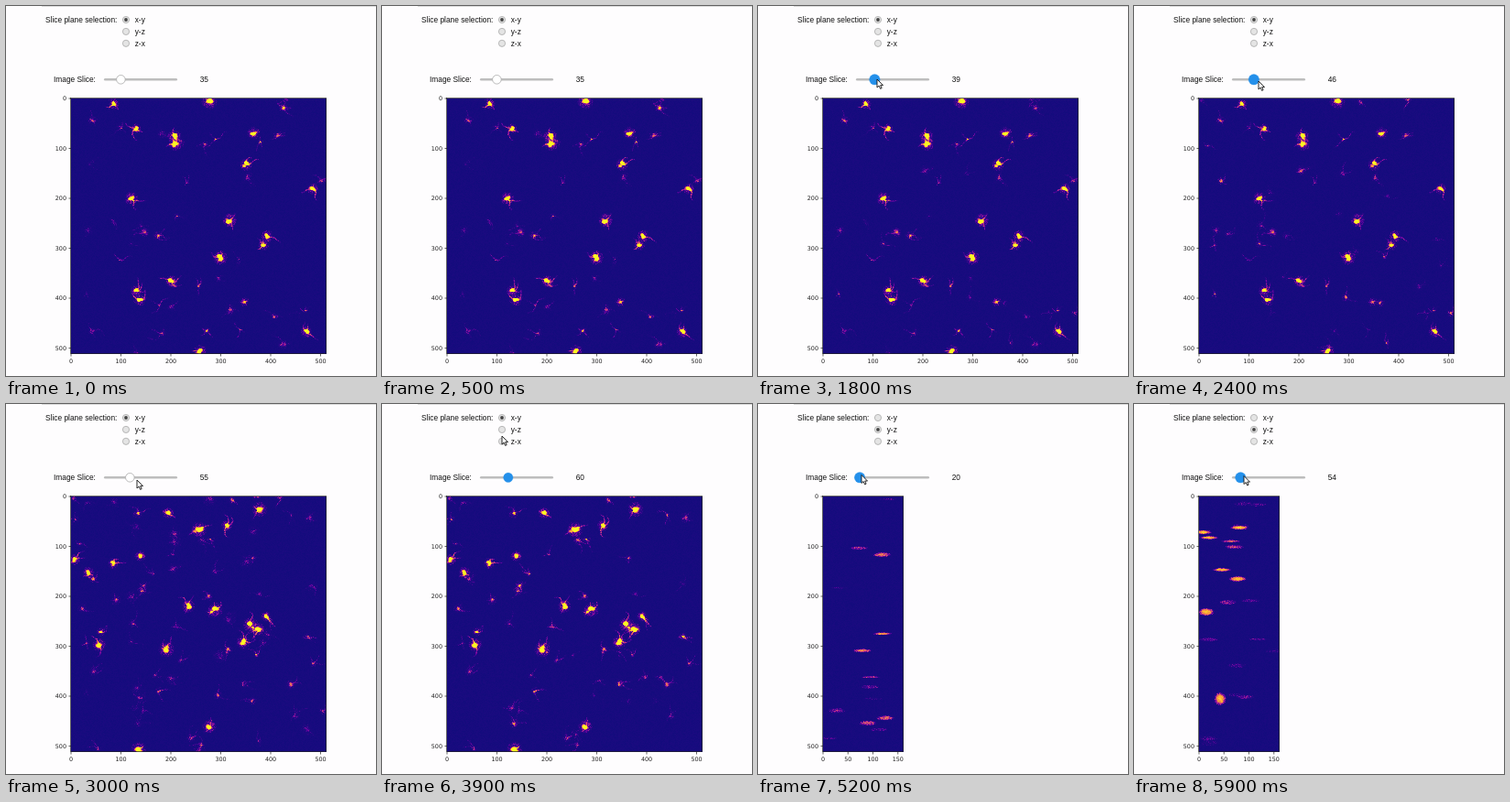
Animation, 404 px wide and 404 px high, one loop 6000 ms. Source, as an HTML page with a canvas:

```html
<!DOCTYPE html>
<html lang="en">
<head>
<meta charset="utf-8">
<title>Image slice viewer</title>
<style>
  html, body { margin: 0; width: 100%; height: 100%; overflow: hidden; background: #fefdfe; }
  canvas { position: absolute; left: 71px; top: 101px; }
  svg { position: absolute; left: 0; top: 0; }
  text { font: 8.36px "Liberation Sans", Arial, sans-serif; fill: #111; }
  #axes text { font: 6.4px "DejaVu Sans", sans-serif; fill: #222; }
  #axes { stroke-width: .7; }
</style>
</head>
<body>
<canvas id="plot"></canvas>
<svg width="404" height="404" viewBox="0 0 404 404">
  <rect x="39" width="365" height="1" fill="#dcdcdc"/>
  <text x="43" y="18">Slice plane selection:</text>
  <g id="radios"></g>
  <text x="52" y="83.3">Image Slice:</text>
  <rect x="107" y="79" width="80" height="2.6" rx="1.3" fill="#bdbdbd"/>
  <circle id="knob" cy="80.3"/>
  <text id="readout" x="216.3" y="83.3" text-anchor="middle"></text>
  <g id="axes"></g>
  <path id="cursor" d="M0 0V9L2.1 7.1L3.6 10.4L5.1 9.7L3.7 6.6H6.5Z" fill="#fff" stroke="#111" stroke-width=".9"/>
</svg>
<script>
const LOOP = 6000, STEP = 100, LEFT = 71, TOP = 101, SIZE = 279, SIDE_WIDTH = 88, SCALE = 0.545;
const $ = id => document.getElementById(id);
const plot = $('plot'), ctx = plot.getContext('2d', { willReadFrequently: true });

// Keyframes: time, then values; linear in between.
const sliceKeys = [[0, 35], [1500, 35], [2400, 46], [3000, 55], [3500, 60], [4299, 60],
  [4300, 0], [4800, 0], [5900, 54]];
const cursorKeys = [[800, 136, 48], [1000, 127, 79], [1500, 127, 79], [2400, 136, 82],
  [3000, 143, 83], [3500, 143, 83], [3900, 131, 35], [4200, 131, 29], [4300, 133, 53],
  [4700, 110, 77], [4900, 110, 77], [5900, 120, 78.5]];

function sample(keys, t) {
  const i = keys.findIndex(k => k[0] > t);
  if (i < 0) return keys.at(-1).slice(1);
  if (!i) return keys[0].slice(1);
  const a = keys[i - 1], b = keys[i], f = (t - a[0]) / (b[0] - a[0]);
  return a.slice(1).map((v, j) => v + (b[j + 1] - v) * f);
}

function seeded(seed) {
  return () => {
    seed = seed + 0x6D2B79F5 | 0;
    let x = Math.imul(seed ^ seed >>> 15, 1 | seed);
    x = x + Math.imul(x ^ x >>> 7, 61 | x) ^ x;
    return ((x ^ x >>> 14) >>> 0) / 4294967296;
  };
}
const random = seeded(7);
const between = (a, b, rnd = random) => a + (b - a) * rnd();
const many = (n, make) => Array.from({ length: n }, make);

// The brightest cells of the two depths; everything else is scattered at random.
const upper = [[118, 107], [142, 134], [222, 104], [184, 143], [185, 151], [270, 139], [262, 173], [335, 200],
  [137, 210], [244, 234], [285, 251], [281, 261], [234, 275], [181, 301], [142, 311], [146, 321], [328, 356], [212, 377]];
const lower = [[177, 119], [211, 137], [241, 133], [277, 115], [147, 166], [117, 174], [75, 170], [90, 184],
  [199, 221], [229, 225], [284, 232], [267, 241], [275, 246], [259, 260], [102, 263], [175, 268], [222, 352], [145, 377]];
const bright = z => ([x, y]) => ({ x, y, z, r: between(1.9, 3), width: z < 50 ? 15 : 9, amp: 1 });
const cells = [
  ...upper.map(bright(36)),
  ...lower.map(bright(60)),
  ...many(130, () => ({
    x: LEFT + between(0, SIZE), y: TOP + between(0, SIZE), z: between(20, 75),
    r: between(.8, 2), width: 9, amp: between(.08, .4)
  }))
];

// Side view: x, y, half height; flat bodies are wider.
const sideFirst = [[93, 138, 3], [84, 134, 1.6], [94, 249, 2], [88, 257, 2.6], [101, 292, 1.3], [79, 328, 1.4], [133, 322, 1.7]];
const sideLast = [[113, 191, 2], [79, 227, 3], [94, 322, 5], [115, 135, 1.6], [75, 140, 1.7], [96, 181, 1.4], [82, 146, 1.3]];
const sideBody = z => ([x, y, ry]) => ({ x, y, ry, z, width: 9, amp: .95 });
const streaks = [
  ...sideFirst.map(sideBody(0)),
  ...sideLast.map(sideBody(54)),
  ...many(80, () => ({
    x: LEFT + between(0, SIDE_WIDTH), y: TOP + between(0, SIZE), z: between(-5, 60),
    ry: between(.7, 2), width: 5, amp: between(.1, .95) ** 2
  }))
];

const stops = [[20, 11, 125], [100, 3, 160], [177, 42, 144], [225, 100, 98], [252, 166, 54], [250, 246, 36]];
const palette = many(256, (_, i) => {
  const p = i / 255 * 5, k = Math.min(4, p | 0);
  return stops[k].map((c, j) => c + (stops[k + 1][j] - c) * (p - k));
});
const grain = many(SIZE * SIZE, random);

const glow = ctx.createRadialGradient(0, 0, 0, 0, 0, 1);
glow.addColorStop(0, '#fff');
glow.addColorStop(.5, '#fffc');
glow.addColorStop(1, '#fff0');

function blob(x, y, rx, ry, amp) {
  ctx.save();
  ctx.translate(x, y);
  ctx.scale(rx * 1.5, ry * 1.5);
  ctx.globalAlpha = amp;
  ctx.fillStyle = glow;
  ctx.fillRect(-1, -1, 2, 2);
  ctx.restore();
}

// A lumpy body with a faint halo and a few wandering branches that fade out.
function drawCell({ x, y, r, amp }, seed) {
  const rnd = seeded(seed), jitter = () => between(-r, r, rnd) * .8;
  blob(x, y, r * 2, r * 2, amp * .2);
  for (let i = 0; i < 4; i++) blob(x + jitter(), y + jitter(), r * .75, r * .6, amp * .9);
  for (let n = 0; n < 3; n++) {
    let px = x, py = y, angle = between(0, 2 * Math.PI, rnd);
    const length = Math.round(between(3, 14, rnd));
    for (let i = 0; i < length; i++) {
      angle += between(-.5, .5, rnd);
      px += Math.cos(angle) * 1.2;
      py += Math.sin(angle) * 1.2;
      blob(px, py, .7, .7, amp * .6 * (1 - i / length));
    }
  }
}

function drawPlot(side, slice) {
  plot.width = side ? SIDE_WIDTH : SIZE;
  plot.height = SIZE;
  ctx.fillRect(0, 0, plot.width, SIZE);
  ctx.translate(-LEFT, -TOP);
  ctx.globalCompositeOperation = 'lighter';
  (side ? streaks : cells).forEach((c, i) => {
    const amp = c.amp * Math.exp(-(((slice - c.z) / c.width) ** 4));
    if (amp < .02) return;
    if (side) blob(c.x, c.y, 8 - c.ry * .7, c.ry, amp);
    else drawCell({ ...c, amp }, i);
  });
  // Dim areas turn grainy, saturated ones stay solid.
  const image = ctx.getImageData(0, 0, plot.width, SIZE), px = image.data;
  for (let i = 0; i < px.length; i += 4) {
    const n = grain[i / 4], v = Math.min(1, (px[i] / 255) ** (.5 + 1.4 * n) + .02 * n);
    px.set(palette[v * 255 | 0], i);
  }
  ctx.putImageData(image, 0, 0);
}

function drawControls(side) {
  $('radios').innerHTML = ['x-y', 'y-z', 'z-x'].map((name, i) => {
    const y = 15 + i * 12.9, on = i === +side;
    return `<circle cx="131" cy="${y}" r="3.6" fill="#e4e4e4" stroke="#aaa" stroke-width=".8"/>` +
      (on ? `<circle cx="131" cy="${y}" r="1.9" fill="#444"/>` : '') +
      `<text x="140.7" y="${y + 3}">${name}</text>`;
  }).join('');
  const width = side ? SIDE_WIDTH : SIZE;
  let axes = `<rect x="${LEFT - .5}" y="${TOP - .5}" width="${width}" height="${SIZE}" fill="none" stroke="#222"/>`;
  for (let v = 0; v <= 500; v += 100) {
    const y = TOP + v * SCALE;
    axes += `<path d="M${LEFT} ${y}h-2.5" stroke="#222"/>` +
      `<text x="66" y="${y + 2.3}" text-anchor="end">${v}</text>`;
  }
  for (let v = 0; v <= (side ? 150 : 500); v += side ? 50 : 100) {
    const x = LEFT + v * SCALE;
    axes += `<path d="M${x} ${TOP + SIZE}v2.5" stroke="#222"/>` +
      `<text x="${x}" y="390" text-anchor="middle">${v}</text>`;
  }
  $('axes').innerHTML = axes;
}

let shownSide, shownSlice;
function frame(now) {
  const t = Math.floor(now % LOOP / STEP) * STEP;
  const side = t >= 4300, slice = Math.round(sample(sliceKeys, t)[0]);
  if (side !== shownSide) drawControls(side);
  if (side !== shownSide || slice !== shownSlice) drawPlot(side, slice);
  shownSide = side;
  shownSlice = slice;

  const held = t >= 1000 && t < 2900 || t >= 4700;
  const blue = held || t >= 3200 && t < 4300;
  const knob = $('knob');
  knob.setAttribute('cx', 108 + slice * 79 / (side ? 511 : 159));
  knob.setAttribute('r', held ? 5.8 : blue ? 5.2 : 4.8);
  knob.setAttribute('fill', blue ? '#2490ea' : '#fff');
  knob.setAttribute('stroke', blue ? '#2490ea' : '#aaa');
  knob.setAttribute('stroke-width', blue ? .3 : .8);
  $('readout').textContent = slice;

  $('cursor').setAttribute('visibility', t < 800 ? 'hidden' : 'visible');
  $('cursor').setAttribute('transform', `translate(${sample(cursorKeys, t)})`);
  requestAnimationFrame(frame);
}
requestAnimationFrame(frame);
</script>
</body>
</html>
```
